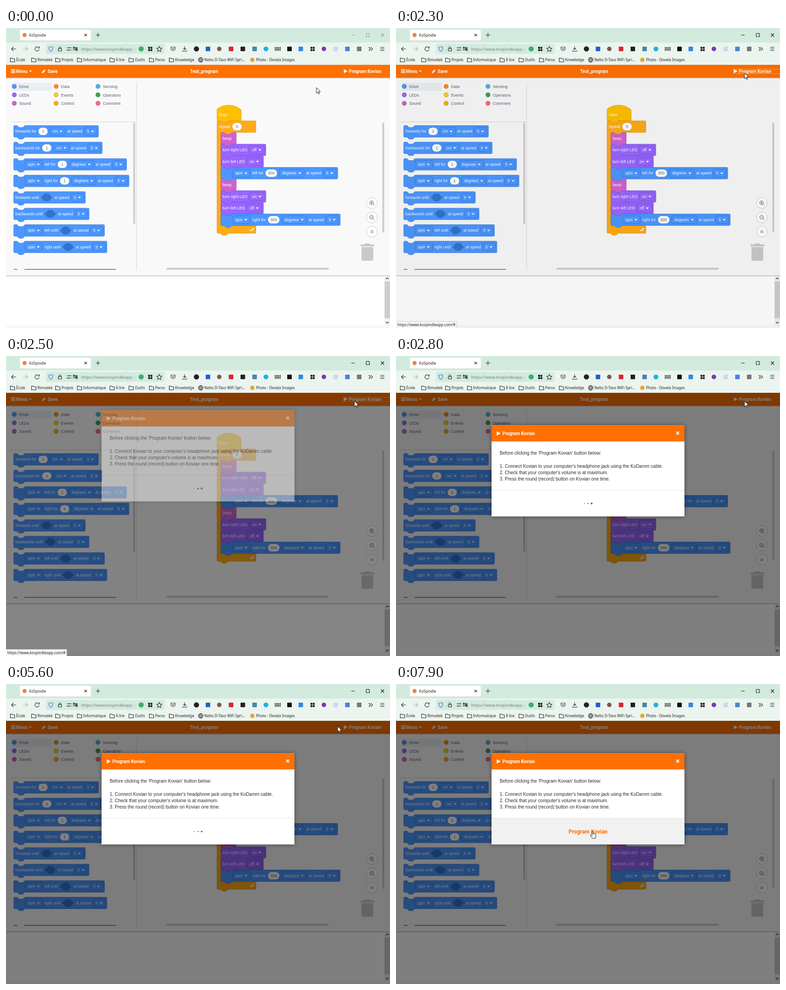
An HTML page that plays this animation: 848 by 660 pixels, repeating every 8000 ms.

```html
<!DOCTYPE html>
<html lang="en">
<head>
<meta charset="utf-8">
<title>Block editor</title>
<style>
html, body { margin: 0; width: 848px; height: 660px; overflow: hidden; background: #f9f9f9; }
svg { display: block; font: 8.1px "Noto Sans", sans-serif; }
.block { font: 8.7px "Liberation Sans", Arial, sans-serif; fill: #fff; }
.label { font: 9px "Liberation Sans", Arial, sans-serif; fill: #575e75; }
.head { font: 700 10px Roboto, sans-serif; fill: #fff; }
.copy { font: 10.1px "Liberation Sans", Arial, sans-serif; fill: #2b2b2b; }
.line { fill: none; stroke: #222; stroke-width: 1.1; }
.zoom { fill: none; stroke: #555; stroke-width: 1; }

.idle, .status, .tip, .focus, .shade, .modal, .dots, .send, .hover, .arrow, .hand {
  animation: 8s step-end -5ms infinite;
}
.idle { animation-name: idle; }
.status { animation-name: status; }
.tip { animation-name: tip; }
.focus { animation-name: focus; }
.shade { animation-name: shade; }
.modal { animation-name: modal; }
.dots { animation-name: leave; }
.arrow { animation-name: arrow; }
.send { animation-name: send; }
.hover, .hand { animation-name: hover; }
.cursor { animation: move 8s -5ms infinite; }
.dots circle { animation: pulse 1333.333ms linear infinite; }

@keyframes idle { 0% { stroke: #999 } 26.25%, 100% { stroke: #111 } }
@keyframes status { 0%, 35%, 100% { opacity: 0 } 12.5% { opacity: 1 } }
@keyframes tip { 0%, 26.25%, 100% { opacity: 0 } 18.75% { opacity: 1 } }
@keyframes focus { 0%, 35%, 100% { opacity: 0 } 26.25% { opacity: 1 } }
@keyframes shade {
  0% { opacity: 0 } 28.75% { opacity: .04 } 30% { opacity: .36 }
  31.25% { opacity: .48 } 32.5%, 100% { opacity: .5 }
}
@keyframes modal {
  0% { opacity: 0; transform: translateY(-60px) }
  31.25% { opacity: .45; transform: translateY(-33px) }
  32.5% { opacity: .97; transform: translateY(-2px) }
  33.75%, 100% { opacity: 1; transform: none }
}
@keyframes leave { 0% { opacity: 1 } 80%, 100% { opacity: 0 } }
@keyframes send { 0% { opacity: 0 } 80%, 100% { opacity: 1 } }
@keyframes arrow { 0% { opacity: 1 } 92.5%, 100% { opacity: 0 } }
@keyframes hover { 0% { opacity: 0 } 92.5%, 100% { opacity: 1 } }
@keyframes pulse { 0%, 45%, 100% { r: var(--r) } 26% { r: 2.5px } }
@keyframes move {
  0% { transform: translate(685.5px, 131px); animation-timing-function: steps(7) }
  8.75% { transform: translate(773px, 104px); animation-timing-function: steps(2) }
  11.25% { transform: translate(769px, 100px); animation-timing-function: steps(3) }
  15% { transform: translate(769.5px, 99px); animation-timing-function: step-end }
  38.75% { transform: translate(769.5px, 99px); animation-timing-function: steps(9) }
  50% { transform: translate(766px, 101px); animation-timing-function: step-end }
  57.5% { transform: translate(766px, 101px); animation-timing-function: steps(5) }
  63.75% { transform: translate(745px, 90px); animation-timing-function: steps(4) }
  68.75% { transform: translate(732.5px, 93px); animation-timing-function: step-end }
  72.5% { transform: translate(732.5px, 93px); animation-timing-function: steps(4) }
  77.5% { transform: translate(715px, 85px); animation-timing-function: steps(5) }
  83.75% { transform: translate(461px, 203px); animation-timing-function: steps(9) }
  95% { transform: translate(433px, 320px); animation-timing-function: steps(3) }
  98.75%, 100% { transform: translate(434px, 323.5px) }
}
</style>
</head>
<body>
<svg id="stage" width="848" height="660" viewBox="0 0 848 660" xmlns="http://www.w3.org/2000/svg"></svg>
<script>
const UNIT = 8 / 15;
const PALETTE = 1.005, SCRIPT = 1.021; // label scale in each area
const DRIVE = ['#4c97ff', '#3373cc'], LED = ['#9966ff', '#774dcb'], SOUND = ['#cf63cf', '#b04ab0'];
const EVENT = ['#ffbf00', '#cc9900'], CONTROL = ['#ffab19', '#cf8b17'];
const NOTCH = 'c2 0 3 1 4 2l4 4c1 1 2 2 4 2h12c2 0 3-1 4-2l4-4c1-1 2-2 4-2';
const BACK = 'c-2 0-3 1-4 2l-4 4c-1 1-2 2-4 2h-12c-2 0-3-1-4-2l-4-4c-1-1-2-2-4-2';
const TOP = `M0 4A4 4 0 0 1 4 0H12${NOTCH}`;
const END = `a4 4 0 0 1-4 4H48${BACK}H4a4 4 0 0 1-4-4z`;

const pen = document.createElement('canvas').getContext('2d');
pen.font = '8.7px "Liberation Sans", Arial, sans-serif';
const wide = s => pen.measureText(s).width;

const text = (x, y, s, attrs = '') => `<text x="${x}" y="${y}" ${attrs}>${s}</text>`;
const rect = (x, y, w, h, fill, attrs = '') =>
  `<rect x="${x}" y="${y}" width="${w}" height="${h}" fill="${fill}" ${attrs}/>`;
const circle = (x, y, r, fill, attrs = '') => `<circle cx="${x}" cy="${y}" r="${r}" fill="${fill}" ${attrs}/>`;
const path = (d, attrs = 'class="line"') => `<path d="${d}" ${attrs}/>`;
const shape = (x, y, d, [fill, edge]) =>
  path(d, `transform="translate(${x} ${y}) scale(${UNIT})" fill="${fill}" stroke="${edge}" stroke-width="1.3"`);

// Parts: "(n)" number, "[s]" dropdown, "<>" condition slot, "_" icon gap, else plain text.
function parts(left, top, list, [fill, edge], scale) {
  let out = '', x = 3.8;
  for (const part of list) {
    const s = part.replace(/[()[\]]/g, '');
    let w = wide(s);
    if (part === '_') {
      w = 17;
    } else if (part === '<>') {
      w = 25;
      out += path(`M${x} 0l8-8.5h9l8 8.5-8 8.5h-9z`, `fill="${edge}"`);
    } else if (part[0] === '(') {
      const tw = w;
      w = Math.max(21.3, tw + 11.5);
      out += rect(x, -8.5, w, 17, '#fff', `rx="8.5" stroke="${edge}" stroke-width=".7"`) +
        text(x + (w - tw) / 2, 3, s, 'fill="#575e75"');
    } else if (part[0] === '[') {
      out += rect(x, -8.5, w + 22.5, 17, fill, `rx="2.2" stroke="${edge}" stroke-width=".8"`) +
        text(x + 6, 3, s) + path(`M${x + w + 10} -1.4h6.4l-3.2 3.6z`, 'fill="#fff"');
      w += 22.5;
    } else {
      out += text(x, 3, s);
    }
    x += w + 4.2;
  }
  return [`<g transform="translate(${left} ${top + 12.8}) scale(${scale})">${out}</g>`, (x - .5) * scale];
}

function block(x, y, color, spec, scale, min = 34) {
  const [inner, width] = parts(x, y, spec ? spec.split('|') : [], color, scale);
  const w = Math.max(min, width) / UNIT;
  return shape(x, y, `${TOP}H${w - 4}a4 4 0 0 1 4 4V44${END}`, color) + inner;
}

function browser() {
  let s = rect(0, 0, 848, 33, '#d3ebdf') + rect(0, 32, 848, 49, '#ebf4ef') +
    rect(30, 3, 158, 25, '#fff', 'rx="3" stroke="#bfd0c7" stroke-width=".7"') +
    circle(41, 15.5, 4.5, '#f58234') + text(51, 18.5, 'KoSpindle', 'font-size="8" fill="#222"') +
    path('M173.5 13l5 5m0-5l-5 5M198 15.5h10m-5-5v10') +
    path('M762.5 15.5h7.5M795.5 12h7v7h-7zM828 12l7 7m0-7l-7 7', 'class="line idle"') +
    path('M22 46H12m4.5-4.5L12 46l4.5 4.5M72.3 43a4.7 4.7 0 1 0 1 4M73.5 40.5v3.5H70') +
    path('M38 46h10m-4.5-4.5L48 46l-4.5 4.5', 'class="line" style="stroke:#aab5af"') +
    rect(88, 35, 262, 22, '#d3ebdf', 'rx="3"') +
    path('M99 41l4.5 1.6c0 4-1 7-4.5 8.9-3.5-1.9-4.5-4.9-4.5-8.9z', 'class="line" style="stroke:#2f62d9"') +
    path('M115.5 45.5h7v5h-7zM117 45.5v-2a2 2 0 0 1 4 0v2M134 43.5h5.5m3 0h2M134 48.5h1.5m3 0h6') +
    path('M149 42.5h5.5v6H149zM154.5 45l3-2v5l-3-2M148 41l10 10') +
    circle(141, 43.5, 1.2, 'none', 'stroke="#222"') + circle(137, 48.5, 1.2, 'none', 'stroke="#222"') +
    '<clipPath id="url"><rect x="160" y="35" width="127" height="22"/></clipPath>' +
    text(166, 49.5, 'https://www.kospindleapp.com/#', 'font-size="9.1" fill="#74827b" clip-path="url(#url)"') +
    rect(276, 36, 12, 20, 'url(#fade)') + circle(298.5, 46, 5.8, '#3fae6d');
  for (const x of [318.5, 677])
    for (const dx of [-4.5, .6]) for (const dy of [-4.5, .6]) s += rect(x + dx, 46 + dy, 4, 4, '#111');
  s += path('M338.5 40.5l1.7 3.6 4 .5-2.9 2.8.7 4-3.5-2-3.5 2 .7-4-2.9-2.8 4-.5z') +
    path('M364.5 42h9v3.5a4.5 4.5 0 0 1-9 0zM367 45l2 2 2-2M394.5 40.5v7m-3-3l3 3 3-3M390 49v2h9v-2');
  const marks = [[446, '#2462c9'], [497, '#dc2333'], [523, '#222'], [549, '#4c84a8'],
    [626, '#111'], [651, '#3289df'], [728, '#c6dbf2'], [754, '#4a82d8'], [780, '#777']];
  for (const [x, c] of marks) s += rect(x - 5, 41, 10, 10, c, 'rx="1"');
  s += circle(420.5, 46, 5.8, '#222') + circle(471, 46, 5, '#7b5b50') + circle(574, 46, 5.3, '#18b5e5') +
    circle(702, 46, 5, '#7b38a8') +
    path('M594.5 41.5v9m3.7-9v9m3.7-9v9m3.7-9v9M593.5 44h13m-13 4h13') +
    path('M801 42l4 4-4 4m4.5-8l4 4-4 4M826.5 42.5h9m-9 3.5h9m-9 3.5h9');
  const folders = [[9, 'École'], [56, 'Rimodek'], [109, 'Projets'], [157, 'Informatique'],
    [229, 'À lire'], [271, 'Outils'], [316, 'Perso'], [360, 'Knowledge']];
  for (const [x, name] of folders)
    s += path(`M${x + .5} 66h3.5l1.5 1.7h4.7v6.8h-9.7z`) + text(x + 13.5, 73, name, 'fill="#222"');
  return s + circle(430, 70, 5, 'none', 'class="line"') +
    path('M425 70h10M430 65c-3 3-3 7 0 10M430 65c3 3 3 7 0 10') +
    text(438, 73, 'Nelto D-Tavo WiFi Spri...', 'fill="#222"') +
    circle(544, 70, 4.8, '#e8a52c') + text(552, 73, 'Photo - Dovela Images', 'fill="#222"');
}

function page() {
  let s = rect(0, 81, 848, 579, '#f9f9f9') + rect(0, 109, 848, 2, '#d9d0c8') + rect(0, 81, 848, 28.5, '#ff7000') +
    path('M11 91.7h9.5M11 94.9h9.5M11 98.1h9.5', 'stroke="#fff" stroke-width="1.8"') +
    path('M51 93.5h6l-3 3.5zM79 99.5l.8-3 5.2-5.2 2.2 2.2-5.2 5.2zM746 90.5l8.5 4.5-8.5 4.5z', 'fill="#fff"') +
    '<g class="head">' + text(22, 98.5, 'Menu') + text(92, 98.5, 'Save') + text(406.5, 98.5, 'Test_program') +
    text(757, 98.5, 'Program Kovian') + '</g>' +
    path('M848 90.5H745.5v10H848', 'class="focus" fill="none" stroke="#ffd3ae" stroke-dasharray="1 1"') +
    path('M10 206.5H288.5M288.5 120V533', 'stroke="#d4d4d4" fill="none"') +
    rect(12, 120.5, 89, 17.5, '#e9eef2', 'rx="3"');
  const groups = [
    ['Drive', '#4c97ff'], ['LEDs', '#9966ff'], ['Sound', '#cf63cf'],
    ['Data', '#ff8c1a'], ['Events', '#ffd014'], ['Control', '#ffab19'],
    ['Sensing', '#47b5e6'], ['Operators', '#40a050'], ['Comment', '#ff6680']];
  groups.forEach(([name, color], i) => {
    const x = 18.3 + 92.4 * (i / 3 | 0), y = 128.5 + 18.6 * (i % 3);
    s += circle(x, y, 5, color, 'stroke="#000" stroke-opacity=".2"') + text(x + 10.7, y + 3.6, name, 'class="label"');
  });

  const palette = [
    'forwards for|(1)|[cm]|at speed|[5]', 'backwards for|(1)|[cm]|at speed|[5]',
    '_|[spin]|left for|(1)|[degrees]|at speed|[5]', '_|[spin]|right for|(1)|[degrees]|at speed|[5]',
    'forwards until|<>|at speed|[5]', 'backwards until|<>|at speed|[5]',
    '_|[spin]|left until|<>|at speed|[5]', '_|[spin]|right until|<>|at speed|[5]'];
  s += '<clipPath id="flyout"><rect x="0" y="207" width="288" height="325"/></clipPath>' +
    '<g class="block" clip-path="url(#flyout)">';
  palette.forEach((spec, i) => s += block(17, 214.6 + 36.33 * i, DRIVE, spec, PALETTE));
  s += block(17, 530.6, DRIVE, '', PALETTE, 226) + '</g><g class="block">';

  const left = 466, top = 204.2, row = 25.6;
  const bar = 'H157a4 4 0 0 1 4 4V';
  s += shape(left, top - row, `M0 0c25-22 71-22 96 0a4 4 0 0 1 4 4V44${END}`, EVENT) +
    parts(left, top - row, ['Start'], EVENT, SCRIPT)[0] +
    shape(left, top, `${TOP}${bar}44a4 4 0 0 1-4 4H64${BACK}H20a4 4 0 0 0-4 4V428a4 4 0 0 0 4 4H28${NOTCH}${bar}460${END}`, CONTROL) +
    parts(left, top, ['repeat', '(5)'], CONTROL, SCRIPT)[0];
  const script = [
    [SOUND, 'beep'], [LED, 'turn right LED|[off]'], [LED, 'turn left LED|[on]'],
    [DRIVE, '_|[spin]|left for|(300)|[degrees]|at speed|[5]'],
    [SOUND, 'beep'], [LED, 'turn right LED|[on]'], [LED, 'turn left LED|[off]'],
    [DRIVE, '_|[spin]|right for|(300)|[degrees]|at speed|[5]']];
  script.forEach(([color, spec], i) => s += block(left + 8.5, top + row * (i + 1), color, spec, SCRIPT));
  s += path('M541 445.2h2.5q1.8 0 1.8-2v-1', 'fill="none" stroke="#fff" stroke-width="1.4"') +
    path('M542.7 442.5l2.6-3.3 2.6 3.3zM541.5 442.8v4.8l-3-2.4z', 'fill="#fff"') + '</g>';

  s += rect(281, 208, 4.3, 223, '#cecece', 'rx="2"') + rect(831, 208, 4.3, 242, '#cecece', 'rx="2"') +
    rect(354, 527.5, 359, 4.3, '#cecece', 'rx="2"');
  for (const y of [385, 416.7, 448]) s += circle(808, y, 12, '#fff', 'stroke="#c9c9c9"');
  for (const y of [385, 416.7])
    s += circle(807.3, y - .5, 4.2, 'none', 'class="zoom"') +
      path(`M810.3 ${y + 2.5}l3.2 3.2M805 ${y - .5}h4.6`, 'class="zoom"');
  s += path('M807.3 382.2v4.6M804.5 446.5h7m-7 3.2h7', 'class="zoom"') +
    path('M783 476h9v-2h12v2h9v4.5h-30zM785 482h26v27a3 3 0 0 1-3 3h-20a3 3 0 0 1-3-3z', 'fill="#c9c9c9"');

  return s + rect(0, 544, 848, 2.5, '#d2d2d2') + rect(0, 546.5, 836, 107, '#fff') +
    rect(836, 546, 12, 108, '#f0f0f0') + rect(836, 557.5, 12, 81, '#cdcdcd') +
    path('M839 552.5l3-3 3 3M839 646.5l3 3 3-3');
}

function dialog() {
  const copy = [
    [217.3, "Before clicking the 'Program Kovian' button below:"],
    [245.7, "1. Connect Kovian to your computer's headphone jack using the KoDamm cable."],
    [260, "2. Check that your computer's volume is at maximum."],
    [274.3, '3. Press the round (record) button on Kovian one time.']];
  let s = '<g class="modal">' +
    rect(211, 152.5, 426, 200.5, '#fff', 'style="filter:drop-shadow(0 0 5px rgba(0,0,0,.45))"') +
    rect(211, 152.5, 426, 35.5, '#ff7000') + path('M222.5 165.5l8.5 4.7-8.5 4.7z', 'fill="#fff"') +
    text(235, 173.8, 'Program Kovian', 'class="head"') +
    path('M619 166.5l6 6m0-6l-6 6', 'stroke="#fff" stroke-width="2.2"');
  for (const [y, line] of copy) s += text(229, y, line, 'class="copy"');
  s += rect(211, 295, 426, 58, '#f1f1f1', 'class="hover"') + rect(211, 295, 426, 1, '#e2e2e2') + '<g class="dots">';
  [.9, 1.2, 1.8].forEach((r, i) =>
    s += circle(416 + 8 * i, 324.5, r, '#666', `style="--r:${r}px;animation-delay:${200 * i - 800}ms"`));
  return s + '</g><g class="send">' +
    text(424, 328.5, 'Program Kovian', 'class="head" text-anchor="middle" style="font-size:12px;fill:#ff7000"') + '</g></g>';
}

const overlays = () =>
  '<g class="status">' + rect(-1, 645.5, 135, 16, '#f7f7f7', 'stroke="#c8c8c8"') +
  text(3, 656, 'https://www.kospindleapp.com/#', 'font-size="8.2" fill="#222"') + '</g>' +
  '<g class="tip">' + rect(769.5, 114.5, 65, 15, '#fff', 'stroke="#b5b5b5"') +
  text(773, 125, 'Program Kovian', 'fill="#575757"') + '</g><g class="cursor">' +
  path('M0 0V12.4l2.9-2.7 1.9 4.5 2-.9-1.9-4.3h4z', 'class="arrow" fill="#fff" stroke="#000" stroke-width=".9"') +
  path('M-1 10V1.2a1.2 1.2 0 0 1 2.4 0V6.2a1.2 1.2 0 0 1 2.2.3a1.1 1.1 0 0 1 2 .4a1 1 0 0 1 1.8.7V11c0 2-1 3-1.2 5H-.6C-1.5 13.5-4 11.5-4.6 9.4c-.3-1.2 1-1.9 1.8-.9z',
    'class="hand" fill="#fff" stroke="#000" stroke-width=".9"') + '</g>';

document.getElementById('stage').innerHTML =
  '<linearGradient id="fade"><stop stop-color="#d3ebdf" stop-opacity="0"/><stop offset="1" stop-color="#d3ebdf"/></linearGradient>' +
  browser() + page() + rect(0, 81, 848, 579, '#000', 'class="shade"') + dialog() + overlays();
</script>
</body>
</html>
```
